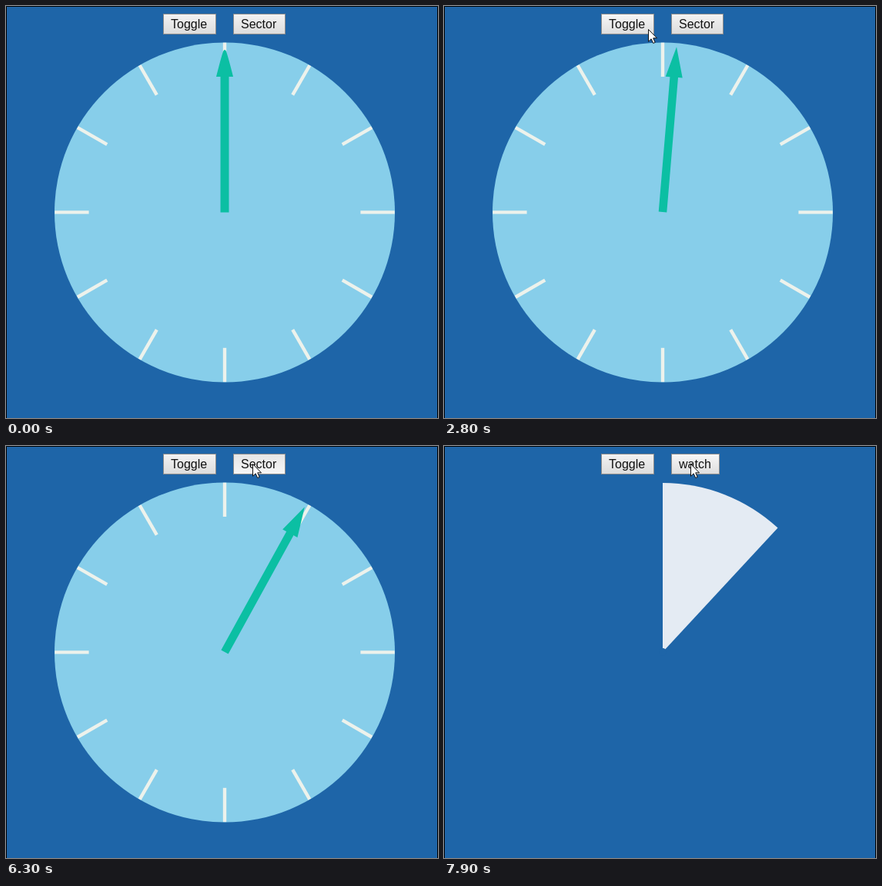
Recreate the animation shown at these times as an HTML page. Size 561 by 536 pixels, loop 8000 ms.

```html
<!DOCTYPE html>
<html lang="en">
<head>
<meta charset="utf-8">
<title>Clock and sector</title>
<style>
  html, body { margin: 0; width: 100%; height: 100%; overflow: hidden; background: #1e65a8; }
  svg { display: block; width: 561px; height: 536px; }
  text { font: 16px Arial, "Liberation Sans", sans-serif; fill: #111; }
</style>
</head>
<body>
<svg viewBox="0 0 561 536">
  <defs>
    <linearGradient id="face" x2="0" y2="1">
      <stop stop-color="#f3f3f3"/><stop offset="1" stop-color="#dcdcdc"/>
    </linearGradient>
    <linearGradient id="lit" x2="0" y2="1">
      <stop stop-color="#f7f7f7"/><stop offset="1" stop-color="#dedede"/>
    </linearGradient>
    <linearGradient id="down" x2="0" y2="1">
      <stop stop-color="#e6e6e6"/><stop offset="1" stop-color="#f6f6f6"/>
    </linearGradient>
  </defs>
  <rect width="561" height="536" fill="#1e65a8"/>
  <g id="clock">
    <circle cx="284" cy="268.5" r="221" fill="#87ceea"/>
    <g id="ticks" stroke="#edf2ec" stroke-width="4.4"></g>
    <path id="hand" fill="#0bbfa3"/>
  </g>
  <g id="sector">
    <path id="wedge" fill="#e4ebf3"/>
    <circle cx="284" cy="268" r="5" fill="#1e65a8"/>
  </g>
  <g stroke="#8b8b8b">
    <rect id="toggle" x="204.5" y="10.5" width="68" height="26"/>
    <rect id="mode" x="295.5" y="10.5" height="26"/>
  </g>
  <text x="214" y="29">Toggle</text>
  <text id="label" x="305" y="29"></text>
  <path id="cursor" d="M.5 .5V16.2L4.1 12.8L6.7 18.5L9.2 17.4L6.7 11.8H11.5Z"
        fill="#fff" stroke="#111" stroke-linejoin="round"/>
  <path d="M.5 536V.5H560.5V536" fill="none" stroke="#000"/>
</svg>
<script>
const LOOP = 8000, STEP = 100, SECOND = 900;
const FIRST_TICK = 2200, PRESS = 6300, SWITCH = 6400;
const CX = 284, CY = 268;
const REST = "M278.5 268.5V92H273Q279 68 282 59Q284 55 286 59Q289 68 295 92H289.5V268.5Z";
const ARROW = "M278.7 268V92H273L284 52.5L295 92H289.3V268Z";

// Pointer stops: time, x, y
const route = [
  [100, 222, 107], [400, 310, 70], [700, 370, 42], [900, 346, 52],
  [1000, 346, 52], [1100, 298, 41], [1500, 248, 22], [2700, 248, 22],
  [2800, 265, 30], [3200, 319, 23], [3300, 319, 23], [3400, 320, 23]
];

const $ = id => document.getElementById(id);
const set = (id, attrs) => {
  for (const key in attrs) $(id).setAttribute(key, attrs[key]);
};
const show = (id, on) => set(id, { visibility: on ? "visible" : "hidden" });

$("ticks").innerHTML = Array.from({ length: 12 }, (_, i) =>
  `<path d="M284 47.7V92" transform="rotate(${i * 30} 284 268.4)"/>`).join("");

function pointerAt(t) {
  const next = route.findIndex(stop => stop[0] > t);
  if (next < 0) return route[route.length - 1].slice(1);
  const [t0, x0, y0] = route[Math.max(0, next - 1)];
  const [t1, x1, y1] = route[next];
  const k = t1 > t0 ? (t - t0) / (t1 - t0) : 0;
  return [Math.round(x0 + (x1 - x0) * k), Math.round(y0 + (y1 - y0) * k)];
}

function wedgePath(degrees) {
  const r = 220, a = degrees * Math.PI / 180;
  const x = CX + r * Math.sin(a), y = CY - r * Math.cos(a);
  return `M${CX} ${CY}V${CY - r}A${r} ${r} 0 0 1 ${x} ${y}Z`;
}

function draw(t) {
  const ticks = t < FIRST_TICK ? 0 : Math.min(5, Math.floor((t - FIRST_TICK) / SECOND) + 1);
  const angle = ticks ? ticks * 6 - 1.2 : 0;
  set("hand", { d: ticks ? ARROW : REST, transform: `rotate(${angle} ${CX} ${CY})` });

  const sector = t >= SWITCH;
  show("clock", !sector);
  show("sector", sector);
  set("wedge", { d: wedgePath(28.8 + (t - 5800) / SECOND * 6) });

  const [x, y] = pointerAt(t);
  show("cursor", t >= 100);
  set("cursor", { transform: `translate(${x} ${y})` });

  const over = (left, right) => t >= 100 && y < 37 && x >= left && x < right;
  const pressed = t >= PRESS && t < SWITCH;
  set("toggle", { fill: over(204, 273) ? "url(#lit)" : "url(#face)" });
  set("mode", {
    width: sector ? 62 : 67,
    fill: pressed ? "url(#down)" : over(295, 363) ? "url(#lit)" : "url(#face)"
  });
  $("label").textContent = sector ? "watch" : "Sector";
}

const start = performance.now();
function frame() {
  const t = (performance.now() - start) % LOOP;
  draw(Math.floor(t / STEP) * STEP);
  requestAnimationFrame(frame);
}
frame();
</script>
</body>
</html>
```
